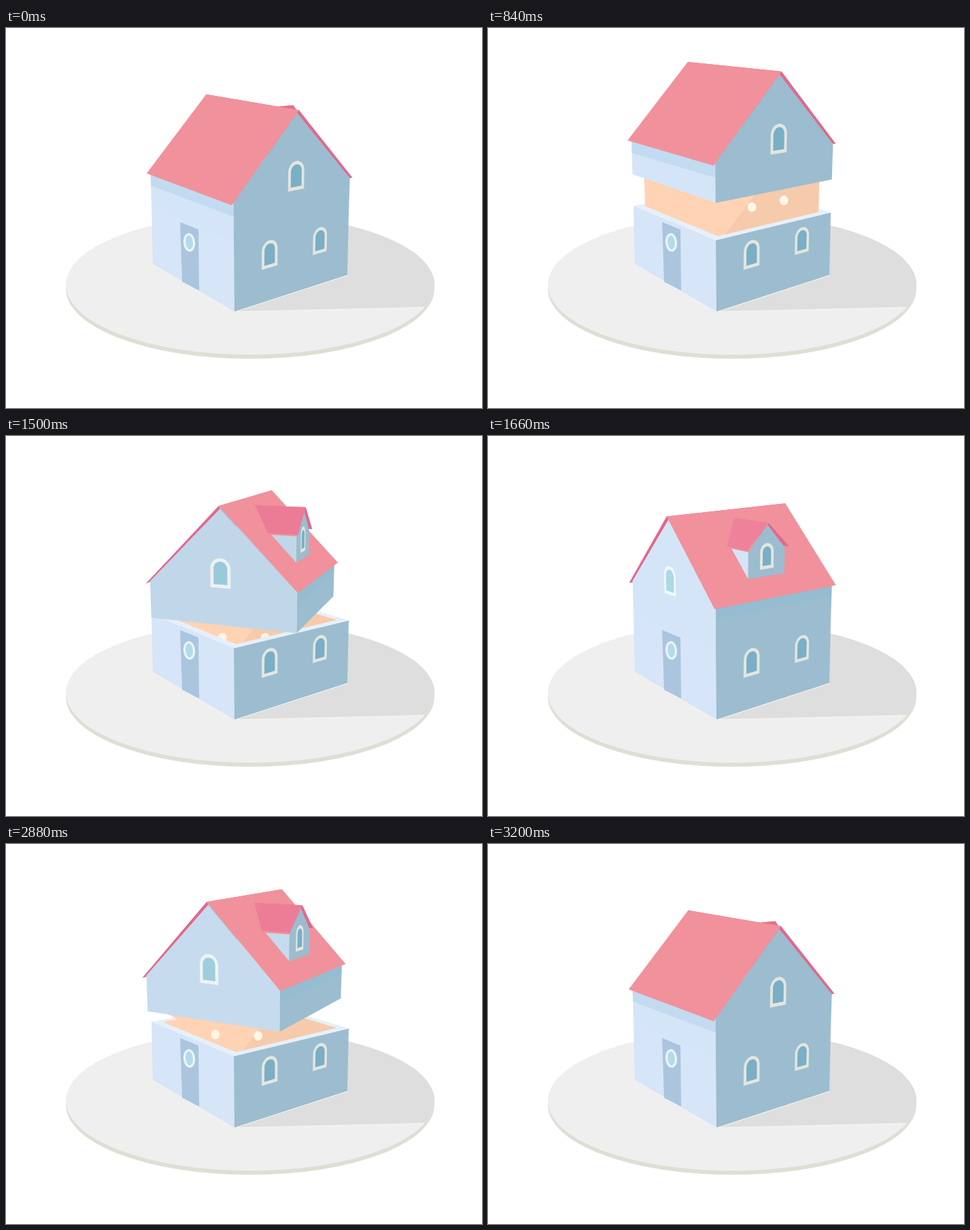
An HTML page for the animation above (4200 ms loop, 700 by 560 pixels).

```html
<!DOCTYPE html>
<html lang="en">
<head>
<meta charset="utf-8">
<title>Turning house</title>
<style>
  html, body { margin: 0; width: 100%; height: 100%; overflow: hidden; background: #fff; }
  svg { display: block; width: 100%; height: 100%; }
</style>
</head>
<body>
<svg viewBox="0 0 700 560" xmlns="http://www.w3.org/2000/svg">
  <defs><clipPath id="inside"><path id="insidePath"/></clipPath></defs>

  <ellipse cx="359" cy="384.5" rx="271" ry="103" fill="#dddfd5"/>
  <ellipse cx="359" cy="378.5" rx="271" ry="103" fill="#efefef"/>
  <path d="M336 418L615 412A271 103 0 0 0 504 291L336 300Z" fill="#dedede"/>
  <path d="M336 418.5L615 412" stroke="#f3f3ea" stroke-width="2"/>

  <path id="rim" fill="#e6f0fa"/>
  <path id="block" fill="#ffd3b3"/>
  <g clip-path="url(#inside)">
    <path d="M347 306L437 186H560V330H347Z" fill="#f6cbab"/>
    <g id="lamps" fill="#fff6e6"></g>
  </g>

  <path d="M214 262L335 313L336 418L216 348Z" fill="#d6e5f7"/>
  <path d="M335 313L504 272L502 364L336 418Z" fill="#9bbdcf"/>
  <path d="M216 348.5L336 418.5L502 364.5" fill="none" stroke="#f3f5ee"/>
  <path d="M256 286L283 297L284 387L259 374Z" fill="#abc5df"/>
  <ellipse cx="269.5" cy="316" rx="7" ry="12" fill="#b1dce8" stroke="#e9f2f5" stroke-width="3.4" transform="rotate(-5 269.5 316)"/>
  <g id="lowerWindows"></g>
  <g id="top"></g>
</svg>

<script>
const $ = id => document.getElementById(id);
const RAD = Math.PI / 180;
const LOOP = 4200, STEP = 40;

// camera
const CX = 359, HORIZON = 11, DIST = 940, EYE = 345, SHIFT = -2.6;
// house: half side, height of the seam, heading of the gable at both rests
const S = 101.2, INNER = 89, SEAM = 94.5;
const RIGHT = 38.06, LEFT = RIGHT - 90;

// p runs out of the gable, q along it, z is up
function project(p, q, z, heading) {
  const sin = Math.sin(heading * RAD), cos = Math.cos(heading * RAD);
  const u = SHIFT + p * sin + q * cos;
  const v = p * cos - q * sin;
  const k = DIST / (DIST - v - 0.2 * z);
  return [CX + u * k, HORIZON + (EYE - z) * k];
}

const pathOf = pts => 'M' + pts.map(a => a[0].toFixed(2) + ' ' + a[1].toFixed(2)).join('L') + 'Z';
const fillOf = (pts, fill, extra = '') => `<path d="${pathOf(pts)}" fill="${fill}" ${extra}/>`;

function facesViewer(pts) {
  let area = 0;
  pts.forEach((a, i) => {
    const b = pts[(i + 1) % pts.length];
    area += a[0] * b[1] - b[0] * a[1];
  });
  return area > 0;
}

function mix(a, b, t) {
  return 'rgb(' + a.map((c, i) => Math.round(c + (b[i] - c) * t)).join() + ')';
}

// 0 on the shaded side, 1 on the lit side
const light = angle => Math.min(1, Math.max(0, (RIGHT - angle) / 90));
const wallColour = angle => mix([155, 189, 207], [212, 229, 248], light(angle));
const frameColour = angle => mix([228, 229, 222], [242, 248, 249], light(angle));
const glassColour = angle => mix([121, 175, 199], [171, 217, 230], light(angle));

function arch(place, mid, half, low, high) {
  const pts = [place(mid - half, low)];
  for (let i = 0; i <= 14; i++) {
    const a = Math.PI * (1 - i / 14);
    pts.push(place(mid + half * Math.cos(a), high - half + half * Math.sin(a)));
  }
  pts.push(place(mid + half, low));
  return pts;
}

function arched(place, angle, mid, half, low, high) {
  const edge = 4.6;
  return fillOf(arch(place, mid, half, low, high), frameColour(angle)) +
    fillOf(arch(place, mid, half - edge, low + edge, high - edge), glassColour(angle));
}

function drawTop(heading, lift) {
  const at = (p, q, z) => project(p, q, z + lift, heading);
  const shape = list => list.map(a => at(...a));
  const turn = light(heading);
  let out = '';
  const add = (pts, fill) => {
    const seen = facesViewer(pts);
    if (seen) out += fillOf(pts, fill);
    return seen;
  };

  const foot = SEAM - 1;
  const ridgeF = [104, 0, 250.5], ridgeB = [-104, 0, 255.5];
  const eaveL = [104, -106, 141.5], eaveR = [104, 103, 146];
  const slopeL = shape([ridgeB, ridgeF, eaveL, [-104, -106, 144.5]]);
  const slopeR = shape([ridgeF, ridgeB, [-104, 106, 147], eaveR]);
  const seenL = facesViewer(slopeL), seenR = facesViewer(slopeR);
  const pink = '#f1919b', dark = '#e2688b', soffit = '#b1c4e0';

  function dormer() {
    const front = [1.5, 83, 242], back = [1.5, 10.5, 242];
    const far = shape([front, back, [-35, 42, 207], [-35, 83, 207]]);
    const near = shape([back, front, [38, 83, 209], [38, 42, 209]]);
    const seenFar = facesViewer(far);
    if (!seenFar) out += fillOf(far, dark);
    add(shape([[33, 45, 206], [33, 80, 206], [33, 80, 170]]), wallColour(heading));
    const face = shape([[33, 80, 170], [33, 80, 206], [1.5, 80, 240], [-30, 80, 206], [-30, 80, 170]]);
    if (add(face, wallColour(heading + 90))) {
      out += arched((x, z) => at(1.5 - x, 80, z), heading + 90, 0, 11.8, 180, 215);
    }
    if (seenFar) out += fillOf(far, dark);
    add(near, mix([229, 112, 143], [240, 129, 154], turn));
  }

  if (!seenL) out += fillOf(slopeL, dark);
  if (!seenR) {
    out += fillOf(slopeR, dark);
    dormer();
  }

  // side walls with the shadow of the eaves
  [-1, 1].forEach(side => {
    const q = side * S, a = side * S;
    const wall = (low, high) => shape([[a, q, high], [-a, q, high], [-a, q, low], [a, q, low]]);
    if (add(wall(foot, 146), wallColour(heading + side * 90))) {
      out += fillOf(wall(side < 0 ? 125.5 : 131.5, 146), '#80b8d0', 'opacity=".22"');
    }
  });

  // roof overhang in front of the gable
  const verge = (eave, q, seen) =>
    fillOf(shape([ridgeF, eave, [S, q, 145], [S, 0, 246.5]]), seen ? soffit : dark);
  out += verge(eaveL, -S, seenL) + verge(eaveR, S, seenR);

  const gable = shape([[S, -S, foot], [S, -S, 145], [S, 0, 246.5], [S, S, 145], [S, S, foot]]);
  if (add(gable, wallColour(heading))) {
    out += arched((x, z) => at(S, x, z), heading, 0, 14, 143.5, 183);
  }

  if (seenL) out += fillOf(slopeL, pink);
  if (seenR) {
    out += fillOf(slopeR, pink);
    dormer();
  }
  $('top').innerHTML = out;
}

const corners = [[-1, -1], [1, -1], [1, 1], [-1, 1]];
const square = (half, z, heading) => corners.map(c => project(c[0] * half, c[1] * half, z, heading));

// the soft middle twists between the fixed base and the turning top
function drawMiddle(heading, lift) {
  const low = square(INNER, SEAM, RIGHT);
  const high = square(INNER, SEAM + lift, heading);
  const d = corners.map((_, i) => {
    const j = (i + 1) % 4;
    const quad = [high[i], high[j], low[j], low[i]];
    return pathOf(facesViewer(quad) ? quad : quad.reverse());
  }).join('');
  $('block').setAttribute('d', d);
  $('insidePath').setAttribute('d', d);
  const lampHeading = RIGHT + (heading - RIGHT) * 0.65;
  $('lamps').innerHTML = [-34, 22].map(q => {
    const [x, y] = project(INNER, q, SEAM + 0.98 * lift - 20, lampHeading);
    return `<ellipse cx="${x.toFixed(2)}" cy="${y.toFixed(2)}" rx="6.4" ry="7"/>`;
  }).join('');
}

const smooth = x => x * x * (3 - 2 * x);
const progress = (t, start, steps) => Math.min(1, (Math.floor((t - start) / STEP) + 1) / steps);

function pose(t) {
  if (t < 600) return [RIGHT, 0];
  if (t < 1300) {
    const x = progress(t, 600, 11);
    return [RIGHT, 49.5 * (1 - Math.exp(-3.8 * x) * Math.cos(7.4 * x))];
  }
  if (t < 2760) {
    const e = smooth(progress(t, 1300, 10));
    return [RIGHT - 90 * e, 49 * (1 - e)];
  }
  const x = progress(t, 2760, 12);
  const e = 0.3 * x + 0.7 * smooth(Math.pow(x, 1.1));
  return [LEFT + 90 * e, 37 * Math.sin(Math.PI * Math.pow(e, 0.8))];
}

const onBase = (q, z) => project(S, q, z, RIGHT);
$('rim').setAttribute('d', pathOf(square(S, SEAM, RIGHT)));
$('lowerWindows').innerHTML = [-44, 45.7].map(q => arched(onBase, RIGHT, q, 13.3, 45, 83)).join('');

const began = performance.now();
function frame() {
  const [heading, lift] = pose((performance.now() - began) % LOOP);
  drawMiddle(heading, lift);
  drawTop(heading, lift);
  requestAnimationFrame(frame);
}
frame();
</script>
</body>
</html>
```
